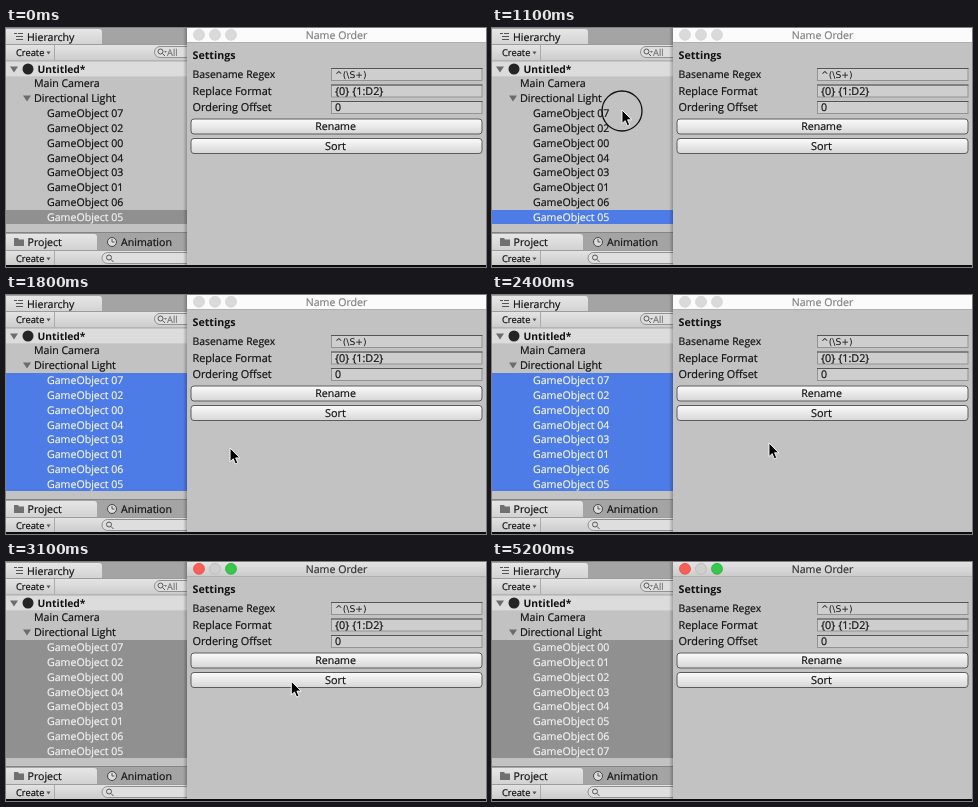
Write an HTML page that moves like this. It is 480 by 239 pixels and loops after 5300 ms.

```html
<!DOCTYPE html>
<html lang="en">
<head>
<meta charset="utf-8">
<title>Name Order</title>
<style>
html, body { margin: 0; width: 100%; height: 100%; overflow: hidden; background: #c2c2c2; }
svg { display: block; width: 480px; height: 239px; }
text { font: 10.6px "Open Sans", "Noto Sans", sans-serif; color: #111; fill: currentColor; stroke: currentColor; stroke-width: .2; text-rendering: geometricPrecision; white-space: pre; }
.bold { font-weight: 700; font-size: 10.3px; stroke: none; }
.small { font-size: 9.3px; }
.wide { font-size: 10.9px; }
.mid { text-anchor: middle; }
.regex { font: 9.2px "DejaVu Sans", sans-serif; stroke: none; }
.line { fill: none; stroke: #555; }
.tab { fill: url(#tab); }
.tool { fill: url(#bar); }
.field { fill: #cecece; stroke: #939393; }
.button { fill: url(#face); stroke: #5c5c5c; }
.search { fill: #dedede; stroke: #919191; }
#rows rect { shape-rendering: crispEdges; }
</style>
</head>
<body>
<svg viewBox="0 0 480 239">
  <defs>
    <linearGradient id="face" x2="0" y2="1"><stop stop-color="#fbfbfb"/><stop offset="1" stop-color="#d6d6d6"/></linearGradient>
    <linearGradient id="bar" x2="0" y2="1"><stop stop-color="#e4e4e4"/><stop offset="1" stop-color="#cbcbcb"/></linearGradient>
    <linearGradient id="tab" x2="0" y2="1"><stop stop-color="#e6e6e6"/><stop offset="1" stop-color="#d2d2d2"/></linearGradient>
    <linearGradient id="shade"><stop stop-opacity="0"/><stop offset="1" stop-opacity=".25"/></linearGradient>
    <g id="lens" class="line"><circle r="2.500"/><path d="M2 2l2.500 2.500"/></g>
    <g id="create"><path d="M48.500 0V15" stroke="#aaa"/><path d="M40.500 6.500h4l-2 3z" fill="#555"/><text class="small" x="10" y="10.700">Create</text></g>
  </defs>

  <!-- hierarchy panel -->
  <rect width="181" height="17" fill="#a4a4a4"/>
  <path class="tab" d="M0 1H93Q96 1 96 4V17H0Z"/>
  <path class="line" d="M8 5.500h3M10 8.500h7M10 11.500h7M12 5.500h5"/>
  <text x="21" y="13">Hierarchy</text>
  <rect class="tool" y="17" width="181" height="16"/>
  <path d="M0 16.500H181M0 33H181" stroke="#9c9c9c"/>
  <use href="#create" y="17"/>
  <rect class="search" x="148.500" y="18.500" width="50" height="11" rx="5.500"/>
  <use href="#lens" x="154.500" y="23.500"/>
  <path d="M158 23h3l-1.500 2z" fill="#777"/>
  <text class="small" x="161" y="27.500" style="color:#777">All</text>
  <rect y="33.500" width="181" height="14.800" fill="#dcdcdc"/>
  <path d="M4 38.500h8l-4 6zM17 67.500h8l-4 6z" fill="#6c6c6c"/>
  <circle cx="22" cy="41" r="5.500" fill="#252525"/>
  <text class="bold" x="31.500" y="44.500">Untitled*</text>
  <text x="28" y="59.300">Main Camera</text>
  <text x="28" y="74" style="font-size:10.800px">Directional Light</text>
  <g id="rows"></g>

  <!-- project panel -->
  <rect y="204" width="181" height="18" fill="#a4a4a4"/>
  <path d="M0 204.500H181" stroke="#858585"/>
  <path class="tab" d="M0 206H88Q91 206 91 209V222H0Z"/>
  <path d="M8 210h4l1 1.500h5v6.500H8z" fill="#707070"/>
  <text x="21.500" y="218">Project</text>
  <circle cx="106" cy="214" r="4.500" fill="#ddd" stroke="#444"/>
  <path class="line" d="M106 211v3h2.500"/>
  <text x="115" y="218">Animation</text>
  <rect class="tool" y="222" width="181" height="15"/>
  <path d="M0 222.500H181" stroke="#9c9c9c"/>
  <use href="#create" y="223"/>
  <rect class="search" x="96" y="224.500" width="105" height="11" rx="5.500"/>
  <use href="#lens" x="103" y="229.500"/>

  <!-- tool window -->
  <rect x="177" width="4" height="237" fill="url(#shade)"/>
  <rect x="181" width="299" height="237" fill="#c2c2c2"/>
  <rect id="title" x="181" width="299" height="14.500"/>
  <path d="M181 14.500H480" stroke="#b0b0b0"/>
  <g id="lights" stroke-width=".7"><circle cx="193" cy="6.800" r="5.500"/><circle cx="209" cy="6.800" r="5.500"/><circle cx="225" cy="6.800" r="5.500"/></g>
  <text id="caption" class="mid" x="330.500" y="10.700">Name Order</text>
  <text class="bold" x="186.500" y="31" style="font-size:10.700px">Settings</text>
  <text x="186.500" y="50" style="font-size:10.400px">Basename Regex</text>
  <text class="wide" x="186.500" y="66.500">Replace Format</text>
  <text class="wide" x="186.500" y="83">Ordering Offset</text>
  <rect class="field" x="325.500" y="40.500" width="150.500" height="12"/>
  <rect class="field" x="325.500" y="57" width="150.500" height="12"/>
  <rect class="field" x="325.500" y="73.500" width="150.500" height="12"/>
  <path class="line" d="M325 40.500H476.500M325 57H476.500M325 73.500H476.500"/>
  <text class="regex" x="329" y="50.300">^(\S+)</text>
  <text x="329" y="66.700" style="font-size:10.800px">{0} {1:D2}</text>
  <text x="329" y="83.200">0</text>
  <rect class="button" x="185" y="91" width="291" height="15" rx="3"/>
  <rect class="button" id="sort" x="185" y="110.500" width="291" height="15" rx="3"/>
  <text class="mid" x="329.500" y="102.300">Rename</text>
  <text class="mid wide" x="329.500" y="121.800">Sort</text>
  <rect y="237" width="480" height="2" fill="#0b0b0b"/>

  <g id="pointer">
    <circle id="ring" cx="0" cy="1" r="20" fill="none" stroke="#111" stroke-width="1.300"/>
    <path d="M0 0V13.500L3.200 10.700L5.300 15.800L7.700 14.800L5.600 9.800H9.800Z" fill="#000" stroke="#fff" stroke-width=".9"/>
  </g>
</svg>
<script>
const $ = id => document.getElementById(id);
const loop = 5300, step = 100, rowHeight = 14.8;
const shuffled = [7, 2, 0, 4, 3, 1, 6, 5];
const clicks = [1100, 2500, 3300];
// time, x, y of the pointer tip
const path = [
  [200, 216, 240], [900, 130, 82], [1400, 130, 82], [2000, 257, 178], [2400, 277, 148],
  [2600, 277, 148], [3200, 286, 117], [4200, 286, 117], [4800, 275, 241]
];

const add = (name, attrs) => {
  const el = document.createElementNS("http://www.w3.org/2000/svg", name);
  for (const key in attrs) el.setAttribute(key, attrs[key]);
  return $("rows").appendChild(el);
};
const rows = shuffled.map((_, i) => {
  const y = 78 + i * rowHeight;
  return {
    back: add("rect", { x: 0, y, width: 177 + 4, height: rowHeight }),
    label: add("text", { x: 41, y: y + 11.2 })
  };
});

function pointerAt(t) {
  const i = path.findIndex(p => p[0] > t);
  if (i < 1) return [0, 300];
  const [t0, x0, y0] = path[i - 1], [t1, x1, y1] = path[i];
  const k = (t - t0) / (t1 - t0), e = k * k * (3 - 2 * k);
  return [x0 + (x1 - x0) * e, y0 + (y1 - y0) * e];
}

function draw(t) {
  const listFocus = t >= 1100 && t < 2500, active = t >= 2500;
  const allSelected = t >= 1200, sorted = t >= 3400;

  rows.forEach(({ back, label }, i) => {
    const on = allSelected || i === 7;
    back.style.fill = !on ? "none" : listFocus ? "#4d7ce6" : "#909090";
    label.style.color = on ? "#f4f4f4" : "#111";
    label.textContent = "GameObject 0" + (sorted ? i : shuffled[i]);
  });

  $("title").style.fill = active ? "url(#bar)" : "#fbfbfb";
  $("caption").style.color = active ? "#333" : "#808080";
  const colors = active ? ["#f95f58", "#cfcfcf", "#35c84a"] : Array(3).fill("#dadada");
  const edges = active ? ["#d9483f", "#b5b5b5", "#26a536"] : Array(3).fill("#d0d0d0");
  [...$("lights").children].forEach((dot, i) => {
    dot.style.fill = colors[i];
    dot.style.stroke = edges[i];
  });

  $("sort").style.fill = t === 3300 ? "#a8a8a8" : "";
  $("ring").style.display = clicks.includes(t) ? "" : "none";
  $("pointer").setAttribute("transform", `translate(${pointerAt(t)})`);
}

const start = performance.now();
function tick() {
  const t = (performance.now() - start) % loop;
  draw(Math.floor(t / step) * step);
  requestAnimationFrame(tick);
}
tick();
</script>
</body>
</html>
```
